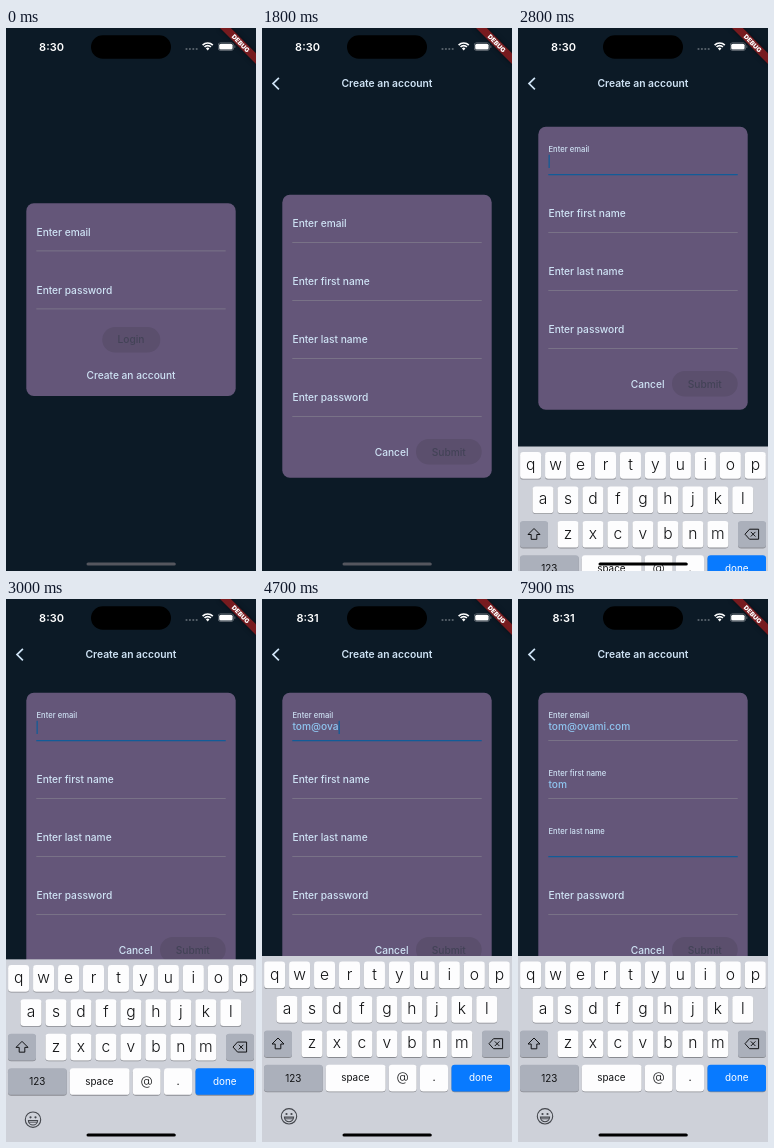
Recreate the animation shown at these times as an HTML page with a canvas. Size 250 px wide and 543 px high, loop 8000 ms.

```html
<!DOCTYPE html>
<html lang="en">
<head>
<meta charset="utf-8">
<title>Sign-up form</title>
<style>
  html, body { margin: 0; width: 100%; height: 100%; overflow: hidden; background: #0c1a26; }
  canvas { display: block; width: 100vw; height: 100vh; }
</style>
</head>
<body>
<canvas></canvas>
<script>
const W = 250, H = 543, LOOP = 8000, STEP = 100;
const BG = '#0c1a26', CARD = '#645679', TEXT = '#cfe3f5', INPUT = '#8fc5f0';
const LINE = '#7f7a8b', FOCUS = '#125c98', OFF_BG = '#5b4f6d', OFF_TEXT = '#434357';
const KEY_H = 186;

const canvas = document.querySelector('canvas');
const ctx = canvas.getContext('2d');

const fields = [
  { label: 'Enter email', focus: 2670, blur: 5950, value: 'tom@ovami.com', first: 3800, gap: 150 },
  { label: 'Enter first name', focus: 5950, blur: 7270, value: 'tom', first: 6500, gap: 250 },
  { label: 'Enter last name', focus: 7270, blur: LOOP, value: '' },
  { label: 'Enter password', focus: Infinity, blur: Infinity, value: '' }
];

const clamp = (v, a = 0, b = 1) => Math.min(b, Math.max(a, v));
const mix = (a, b, p) => a + (b - a) * p;
const easeOut = p => 1 - Math.pow(1 - p, 3);
const spring = ms => {
  const s = Math.max(0, ms) * 0.01826;
  return 1 - (1 + s) * Math.exp(-s);
};

function text(str, x, y, size, color, weight = 500, align = 'left') {
  ctx.font = `${weight} ${size}px Inter, sans-serif`;
  ctx.textAlign = align;
  ctx.fillStyle = color;
  ctx.fillText(str, x, y);
}

function box(x, y, w, h, r, color) {
  ctx.fillStyle = color;
  ctx.beginPath();
  ctx.roundRect(x, y, w, h, r);
  ctx.fill();
}

function stroke(points, width, color, closed) {
  ctx.beginPath();
  points.forEach(([x, y]) => ctx.lineTo(x, y));
  if (closed) ctx.closePath();
  ctx.lineWidth = width;
  ctx.strokeStyle = color;
  ctx.stroke();
}

function dot(x, y, r, color) {
  ctx.fillStyle = color;
  ctx.beginPath();
  ctx.arc(x, y, r, 0, Math.PI * 2);
  ctx.fill();
}

// Cursor stays solid for half a second, then fades out and back in.
function blink(ms) {
  const p = (ms % 1000) / 1000;
  if (p < 0.5) return 1;
  return p < 0.75 ? clamp(1 - (p - 0.5) / 0.12) : clamp((p - 0.88) / 0.12);
}

function field(f, top, t) {
  const float = easeOut(clamp((t - f.focus) / 167));
  const active = t >= f.focus && t < f.blur;
  text(f.label, 30.5, top + mix(32.2, 24.8, float), 10.18 * mix(1, 0.75, float), TEXT);

  const count = f.value ? clamp(Math.floor((t - f.first) / f.gap) + 1, 0, f.value.length) : 0;
  const typed = f.value.slice(0, count);
  text(typed, 30.5, top + 37.5, 10.18, INPUT);

  ctx.fillStyle = active ? FOCUS : LINE;
  ctx.fillRect(30.3, top + 47.2, 189.4, active ? 1.27 : 0.8);

  if (active) {
    const since = count ? f.first + (count - 1) * f.gap : f.focus;
    ctx.globalAlpha = blink(t - since);
    ctx.fillStyle = FOCUS;
    ctx.fillRect(30.5 + ctx.measureText(typed).width, top + 28, 1.27, 13.2);
    ctx.globalAlpha = 1;
  }
}

function card(top, height) {
  box(20.3, top, 209.4, height, 7.6, CARD);
}

function loginPage() {
  const top = 175.3;
  card(top, 192.6);
  field(fields[0], top, 0);
  field(fields[3], top + 58, 0);
  box(96.3, 299, 58, 25.5, 12.75, OFF_BG);
  text('Login', 125, 315.3, 10.18, OFF_TEXT, 500, 'center');
  text('Create an account', 125, 351.2, 10.18, TEXT, 500, 'center');
}

function signupPage(t) {
  const inset = KEY_H * spring(t - 2658);
  const top = Math.max(93.8, 166.8 - inset / 2);
  ctx.fillStyle = BG;
  ctx.fillRect(0, 0, W, H);
  stroke([[16.9, 49.8], [11, 55.6], [16.9, 61.4]], 1.7, TEXT);
  text('Create an account', 125, 59.3, 10.3, TEXT, 600, 'center');
  card(top, 283);
  fields.forEach((f, i) => field(f, top + i * 58, t));
  text('Cancel', 129.6, top + 261, 10.18, TEXT, 500, 'center');
  box(154, top + 244.3, 65.7, 25.5, 12.75, OFF_BG);
  text('Submit', 186.8, top + 261, 10.18, OFF_TEXT, 500, 'center');
}

function key(x, y, w, color = '#fdfdfe') {
  box(x, y + 0.8, w, 26.7, 3.2, '#898b91');
  box(x, y, w, 26.7, 3.2, color);
}

function keyboard(top) {
  const GRAY = '#abb0bb', INK = '#111214';
  ctx.save();
  ctx.translate(0, top);
  ctx.fillStyle = '#ced1d9';
  ctx.fillRect(0, 0, W, KEY_H + 1);

  ['qwertyuiop', 'asdfghjkl', 'zxcvbnm'].forEach((row, r) => {
    const y = 5.6 + r * 34.4, x0 = [12.6, 25, 50][r];
    [...row].forEach((c, i) => {
      const x = x0 + i * 24.97;
      key(x - 10.5, y, 21);
      text(c, x, y + 17.9, 15.6, INK, 350, 'center');
    });
  });

  key(2, 74.4, 28, GRAY);
  stroke([[16, 82], [22, 88], [18.8, 88], [18.8, 92.8], [13.2, 92.8], [13.2, 88], [10, 88]], 1, INK, true);
  key(220, 74.4, 28, GRAY);
  stroke([[227, 87.7], [231.5, 82.7], [240.6, 82.7], [240.6, 92.7], [231.5, 92.7]], 1, INK, true);
  stroke([[232.8, 85.4], [237.4, 90]], 1, INK);
  stroke([[237.4, 85.4], [232.8, 90]], 1, INK);

  const y = 108.8, base = y + 16.6;
  key(2, y, 58.8, GRAY);
  text('123', 31.4, base + 0.4, 9.9, INK, 400, 'center');
  key(63.8, y, 59.8);
  text('space', 93.4, base, 9.9, INK, 400, 'center');
  key(126.8, y, 27.8);
  text('@', 140.7, base, 12.6, INK, 350, 'center');
  key(158, y, 28);
  text('.', 172, base, 11, INK, 400, 'center');
  key(189.5, y, 58.5, '#087aff');
  text('done', 218.8, base, 9.9, '#fff', 400, 'center');

  smile(27, 160.3);
  ctx.restore();
}

function smile(x, y) {
  const INK = '#43464c';
  ctx.lineWidth = 1.1;
  ctx.strokeStyle = INK;
  ctx.beginPath();
  ctx.arc(x, y, 7.7, 0, Math.PI * 2);
  ctx.stroke();
  dot(x - 2.5, y - 2.3, 1.1, INK);
  dot(x + 2.5, y - 2.3, 1.1, INK);
  ctx.beginPath();
  ctx.arc(x, y + 0.8, 4.6, 0, Math.PI);
  ctx.closePath();
  ctx.stroke();
  stroke([[x - 4, y + 2.5], [x + 4, y + 2.5]], 0.9, INK);
}

function statusBar(t) {
  text(t < 4000 ? '8:30' : '8:31', 45.5, 22.7, 11, '#fff', 600, 'center');
  box(85, 7.2, 80, 23.6, 11.8, '#000');
  for (let i = 0; i < 4; i++) dot(180.5 + i * 3.4, 21, 1.1, '#59636c');

  ctx.strokeStyle = '#fff';
  ctx.lineWidth = 1.7;
  ctx.lineCap = 'butt';
  for (const r of [7.2, 4.5]) {
    ctx.beginPath();
    ctx.arc(201.7, 22.2, r, -Math.PI * 0.75, -Math.PI * 0.25);
    ctx.stroke();
  }
  ctx.fillStyle = '#fff';
  ctx.beginPath();
  ctx.moveTo(201.7, 22.6);
  ctx.arc(201.7, 22.2, 2.5, -Math.PI * 0.75, -Math.PI * 0.25);
  ctx.fill();

  box(212, 14.5, 15.8, 8.2, 2.6, '#6d757d');
  box(212.6, 15.1, 14.6, 7, 2.1, BG);
  box(213.2, 15.7, 13.4, 5.8, 1.6, '#fff');
  box(228.4, 17.3, 0.9, 2.7, 0.4, '#6d757d');
}

function banner() {
  ctx.save();
  ctx.translate(W, 0);
  ctx.rotate(Math.PI / 4);
  ctx.shadowColor = 'rgba(0,0,0,.5)';
  ctx.shadowBlur = 4;
  ctx.fillStyle = '#771b1f';
  ctx.fillRect(-25.5, 17.8, 51, 7.65);
  ctx.shadowColor = 'transparent';
  text('DEBUG', 0, 24, 6.4, '#fff', 900, 'center');
  ctx.restore();
}

function draw(t) {
  ctx.fillStyle = BG;
  ctx.fillRect(0, 0, W, H);

  const slide = 1 - Math.pow(1 - clamp((t - 1360) / 440), 4);
  if (slide < 1) {
    ctx.save();
    ctx.translate(-slide * W / 3, 0);
    loginPage();
    ctx.restore();
  }
  if (slide > 0) {
    ctx.save();
    ctx.translate((1 - slide) * W, 0);
    signupPage(t);
    ctx.restore();
  }

  const rise = spring(t - 2674);
  if (rise > 0) keyboard(H - KEY_H * rise);
  statusBar(t);
  banner();
  box(80.5, 534.4, 89.3, 3.2, 1.6, rise > 0.1 ? '#000' : '#55565e');
}

function frame(now) {
  const ratio = devicePixelRatio || 1;
  const w = Math.round(innerWidth * ratio), h = Math.round(innerHeight * ratio);
  if (canvas.width !== w || canvas.height !== h) {
    canvas.width = w;
    canvas.height = h;
  }
  ctx.setTransform(w / W, 0, 0, h / H, 0, 0);
  draw(Math.floor((now % LOOP) / STEP) * STEP);
  requestAnimationFrame(frame);
}
requestAnimationFrame(frame);
</script>
</body>
</html>
```
